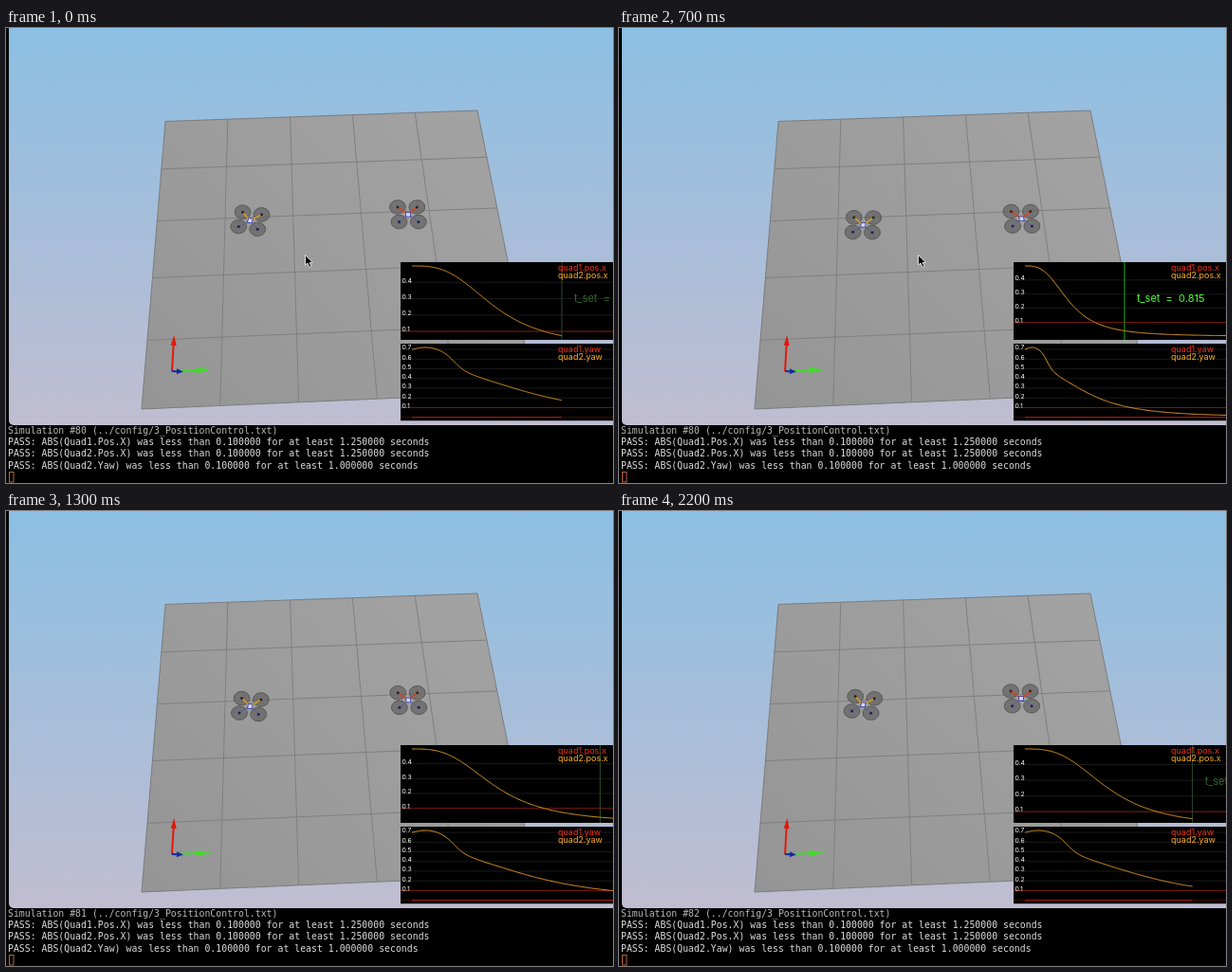
An HTML page with a canvas that plays this animation: 640 by 480 pixels, repeating every 2.3 s.

```html
<!DOCTYPE html>
<html>
<head>
<meta charset="utf-8">
<style>
html, body { margin: 0; width: 100%; height: 100%; overflow: hidden; background: #000; }
canvas { display: block; width: 640px; height: 480px; }
</style>
</head>
<body>
<canvas id="stage" width="640" height="480"></canvas>
<script>
const c = document.getElementById('stage').getContext('2d');
const SANS = 'Inter, "Liberation Sans", sans-serif';
const MONO = '"DejaVu Sans Mono", monospace';
const ORANGE = '#ffb02a', RED = '#ee321c', SETTLED = 0.815, DT = 0.005;

// Simulation runs; rate is simulated seconds per 100 ms step
const runs = [
  { from: 0, t0: .65, rate: .157 },
  { from: 8, t0: .09, rate: .163 },
  { from: 19, t0: .03, rate: .232 }
];

// Smooth drop from 1 to 0, half way at time `half`
const fall = (t, half, power) => 1 / (1 + (t / half) ** power);
const posAt = t => .5 * fall(t, .358, 3);
const yawAt = t => .49 * fall(t, .52, 2.7) + (.21 + .022 * Math.sin(25 * t)) * fall(t, .19, 8);

const mix = (a, b, u) => [a[0] + (b[0] - a[0]) * u, a[1] + (b[1] - a[1]) * u];

function path(points, color, width = 1, fill) {
  c.beginPath();
  points.forEach(p => c.lineTo(p[0], p[1]));
  if (fill) { c.closePath(); c.fillStyle = fill; c.fill(); }
  if (color) { c.strokeStyle = color; c.lineWidth = width; c.stroke(); }
}

function ellipse(x, y, rx, ry, fill, stroke) {
  c.beginPath();
  c.ellipse(x, y, rx, ry, 0, 0, 7);
  c.fillStyle = fill;
  c.fill();
  if (stroke) { c.strokeStyle = stroke; c.lineWidth = 1; c.stroke(); }
}

function text(s, x, y, size, color, family = SANS) {
  c.font = size + 'px ' + family;
  c.fillStyle = color;
  c.fillText(s, x, y);
}

function gradient(x0, y0, x1, y1, from, to) {
  const g = c.createLinearGradient(x0, y0, x1, y1);
  g.addColorStop(0, from);
  g.addColorStop(1, to);
  return g;
}

function arrow(from, to, color, headLength, headWidth) {
  const length = Math.hypot(to[0] - from[0], to[1] - from[1]);
  const neck = mix(to, from, headLength / length);
  const nx = (to[1] - from[1]) / length * headWidth / 2, ny = (from[0] - to[0]) / length * headWidth / 2;
  path([from, neck], color, 2);
  path([to, [neck[0] + nx, neck[1] + ny], [neck[0] - nx, neck[1] - ny]], null, 0, color);
}

function floor() {
  const a = [168, 98.5], b = [497, 87], d = [143, 402], e = [557, 384];
  path([a, b, e, d], '#7c7c7c', 1, gradient(150, 400, 470, 90, '#959595', '#a2a2a2'));
  const squeeze = (e[0] - d[0]) / (b[0] - a[0]);
  for (let i = 1; i < 5; i++) {
    const u = i / 5, depth = u / (u + (1 - u) * squeeze);
    path([mix(a, b, u), mix(d, e, u)], '#808080');
    path([mix(a, d, depth), mix(b, e, depth)], '#808080');
  }
}

function scene() {
  c.fillStyle = '#000';
  c.fillRect(0, 0, 640, 480);
  c.beginPath();
  c.roundRect(3, -9, 650, 428, 5);
  c.fillStyle = gradient(0, 0, 0, 419, '#8bbfe3', '#c1bdd1');
  c.fill();
  floor();
  arrow([175, 362], [177.3, 324], '#e01a0c', 11, 6);
  arrow([178, 362], [217, 360.5], '#40dc28', 16, 6);
  arrow([175, 362], [187, 362.5], '#1828a0', 7, 6);
}

function drone(x, y, yaw, shear, frontColor) {
  const cs = Math.cos(yaw), sn = Math.sin(yaw);
  const place = ([a, b]) => {
    const dy = (a * sn + b * cs) * 7.8;
    return [x + (a * cs - b * sn) * 10.2 + dy * shear, y + dy];
  };
  const corners = [[-1, -1], [1, -1], [1, 1], [-1, 1]];
  const rotors = corners.map(place);
  for (const p of rotors) ellipse(...p, 8.4, 7.3, 'rgba(100,100,100,.75)', '#585858');
  rotors.forEach((p, i) => {
    const front = i < 2;
    path([[x, y], p], front ? frontColor : '#5560a0', front ? 1.5 : 1);
    ellipse(...p, 1.5, 1.5, front ? '#3a2420' : '#202458');
  });
  path(corners.map(([a, b]) => place([a * .27, b * .35])), null, 0, '#2c2c9c');
  path(corners.map(([a, b]) => place([a * .2, b * .25])), null, 0, '#d0d4f4');
}

function pointer() {
  path([[315.5, 239.5], [315.5, 250], [318, 248], [320, 252.5], [322, 251.5], [320, 247.5], [323.5, 247.3]],
    '#ddd', 1, '#000');
}

function plot(top, height, valueAt, name, t, isPos) {
  c.save();
  c.beginPath();
  c.rect(416, top, 224, height);
  c.clip();
  c.fillStyle = '#000';
  c.fillRect(416, top, 224, height);

  const end = t - DT, count = 240;
  const values = Array.from({ length: count + 1 }, (_, i) => valueAt(end * i / count));
  let hi = Math.max(...values), lo = isPos ? Math.min(...values) : 0;
  if (hi - lo < .001) {
    const mid = (hi + lo) / 2;
    hi = mid + .0005;
    lo = mid - .0005;
  }
  const range = hi - lo, scale = Math.min(245, 226 / end);
  const toX = s => 428 + s * scale;
  const toY = v => top + 4 + (hi - v) / range * 73.7;
  const rule = (v, color) => path([[416, toY(v)], [640, toY(v)]], color);

  // Largest 1 or 5 step that gives at least two divisions
  const half = range / 2 + 1e-9, power = Math.floor(Math.log10(half));
  const unit = 10 ** power, step = half >= 5 * unit ? 5 * unit : unit;
  const ticks = [];
  for (let n = Math.max(1, Math.ceil(lo / step)); n * step < hi - 1e-6; n++) ticks.push(n * step);
  ticks.forEach(v => rule(v, '#1a1a1a'));
  if (lo < .1) rule(.1, '#74160e');

  if (isPos) {
    const set = Math.min(t, SETTLED), x = toX(set - DT), done = t > 1.2;
    path([[x, top], [x, top + height]], done ? '#16b016' : '#2c4a2c');
    text('t_set  =  ' + set.toFixed(3), x + 13, 289, 11, done ? '#4cff30' : '#2f6a2c');
  } else {
    rule(0, '#400c08');
    path([[428, toY(0)], [toX(end), toY(0)]], '#a82014');
  }
  path(values.map((v, i) => [toX(end * i / count), toY(v)]), '#e09a24');
  ticks.forEach(v => text(v.toFixed(-power), 417.5, toY(v) + .3, 6.8, '#fff'));
  text('quad1.' + name, 582, top + 9, 9, RED);
  text('quad2.' + name, 582, top + 17, 9, ORANGE);
  c.restore();
}

function terminal(run) {
  const pass = (what, secs) => `PASS: ABS(${what}) was less than 0.100000 for at least ${secs} seconds`;
  const lines = [
    `Simulation #${run} (../config/3_PositionControl.txt)`,
    pass('Quad1.Pos.X', '1.250000'),
    pass('Quad2.Pos.X', '1.250000'),
    pass('Quad2.Yaw', '1.000000')
  ];
  lines.forEach((s, i) => text(s, 2, 428 + 12.2 * i, 9.86, i ? '#dcdcdc' : '#b8b8b8', MONO));
  c.strokeStyle = '#b8643a';
  c.lineWidth = 1;
  c.strokeRect(3.5, 468.5, 4.5, 10.5);
}

function draw(now) {
  const step = Math.floor(now % 2300 / 100);
  const run = runs.findLastIndex(r => r.from <= step), { from, t0, rate } = runs[run];
  const t = t0 + rate * (step - from), pos = posAt(t);
  scene();
  drone(257.4, 208 - 67 * pos, yawAt(t), -.05, '#dca01c');
  drone(424.5 - 8 * pos, 201.5 - 67 * pos, 0, .1, '#e04020');
  if (run === 0) pointer();
  plot(247, 82, posAt, 'pos.x', t, true);
  plot(333, 81.5, yawAt, 'yaw', t, false);
  // The heading changes one step after a restart
  terminal(80 + run - (run > 0 && step === from));
}

const start = performance.now();
function tick() {
  draw(performance.now() - start);
  requestAnimationFrame(tick);
}
tick();
</script>
</body>
</html>
```
